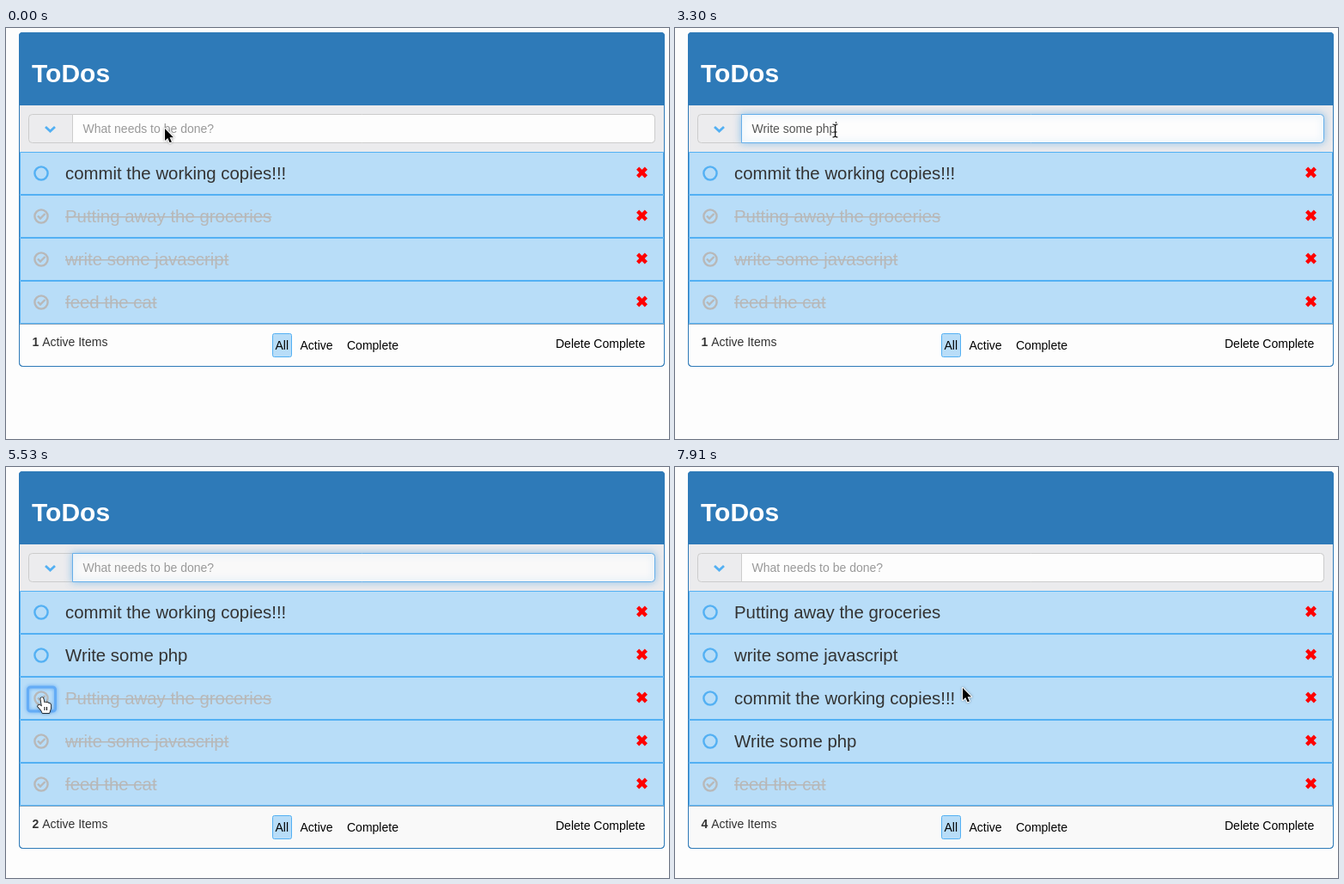
Write an HTML page with a canvas that moves like this. It is 772 by 478 pixels and loops after 8000 ms.

```html
<!DOCTYPE html>
<html lang="en">
<head>
<meta charset="utf-8">
<title>ToDos</title>
<style>
html, body { margin: 0; width: 100%; height: 100%; overflow: hidden; background: #fdfdfd; }
canvas { display: block; }
</style>
</head>
<body>
<canvas id="stage" width="772" height="478"></canvas>
<script>
const g = document.getElementById('stage').getContext('2d');
const LOOP = 8000, MOVE_START = 4490, TICK = 148;
const BLUE = '#2e7ab8', SKY = '#53b0f3', ROW = '#b8ddf8', DONE = '#b8b8b8';
const NEW_ITEM = 'Write some php';
const COMMIT = 'commit the working copies!!!', GROCERIES = 'Putting away the groceries';
const SCRIPT = 'write some javascript', CAT = 'feed the cat';

// The first `active` items of each list are open, the rest are done.
const lists = [
  { active: 1, items: [COMMIT, GROCERIES, SCRIPT, CAT] },
  { active: 2, items: [COMMIT, NEW_ITEM, GROCERIES, SCRIPT, CAT] },
  { active: 3, items: [GROCERIES, COMMIT, NEW_ITEM, SCRIPT, CAT] },
  { active: 4, items: [GROCERIES, SCRIPT, COMMIT, NEW_ITEM, CAT] }
];

// Pointer path: tick, x, y
const path = [
  [-1, 186, 119], [6, 42, 268], [9, 42, 268], [10, 41, 284], [11, 39, 297], [12, 42, 318],
  [14, 42, 318], [15, 60, 318], [16, 60, 318], [19, 395, 269], [22, 395, 269], [23, 335, 257]
];

const arrow = new Path2D('M0 0V14L3.3 11L5.6 16.3L7.9 15.4L5.6 10.2H10Z');
const beam = new Path2D('M-3-7Q0-7 0-5Q0-7 3-7M0-5V6M-3 8Q0 8 0 6Q0 8 3 8M-2 2H2');
const hand = new Path2D('M-1.7 1.2Q0-1 1.5 1.2L2.6 6.2Q4 5 5.2 6.3Q6.8 5.4 7.8 7Q9.6 6.5 10.2 8.6' +
  'L10 13L8.4 18H.5L-1 15L-5 10.5Q-4.4 8-2 9.3L-.2 10.4Z');

function text(str, x, y, size, color, weight = 'normal') {
  g.font = `${weight} ${size}px "Liberation Sans", Arial, sans-serif`;
  g.fillStyle = color;
  g.fillText(str, x, y);
  return g.measureText(str).width;
}

function box(x, y, w, h, radius, fill, stroke) {
  g.beginPath();
  g.roundRect(x, y, w, h, radius);
  if (fill) { g.fillStyle = fill; g.fill(); }
  if (stroke) { g.strokeStyle = stroke; g.stroke(); }
}

function line(points, color, width) {
  g.beginPath();
  points.forEach(([x, y]) => g.lineTo(x, y));
  g.strokeStyle = color;
  g.lineWidth = width;
  g.stroke();
  g.lineWidth = 1;
}

function withGlow(color, blur, draw) {
  g.save();
  g.shadowColor = color;
  g.shadowBlur = blur;
  draw();
  g.restore();
}

function drawRow(label, y, done) {
  box(16.5, y + .5, 749, 49, 0, ROW, SKY);
  const cy = y + 25, color = done ? DONE : SKY;
  g.beginPath();
  g.arc(41, cy, 7.6, 0, 7);
  g.strokeStyle = color;
  g.lineWidth = 2.4;
  g.stroke();
  g.lineWidth = 1;
  if (done) line([[37, cy - .5], [40, cy + 2.5], [45.5, cy - 3]], color, 2.4);
  const width = text(label, 69, y + 32, 20.4, done ? DONE : '#333');
  if (done) {
    g.fillStyle = DONE;
    g.fillRect(69, y + 25, width, 1.5);
  }
  for (const s of [-1, 1])
    line([[740.5 - 4.9, cy - 1 - 4.9 * s], [740.5 + 4.9, cy - 1 + 4.9 * s]], '#f00', 4.4);
}

function drawInput(t, glow) {
  const tinted = t >= 3600 && glow;
  box(26.5, 100.5, 729, 33, 4, '#ececee', '#ccc');
  line([[46, 115], [51.5, 120], [57, 115]], SKY, 2.8);
  const field = stroke => box(77.5, 100.5, 678, 33, [0, 4, 4, 0], tinted ? '#f9f9f9' : '#fdfdfd', stroke);
  field('#ccc');
  if (glow) {
    g.globalAlpha = glow;
    withGlow('rgba(102,175,233,.7)', 8, () => field('#66afe9'));
    g.globalAlpha = 1;
  }
  const typed = NEW_ITEM.slice(0, typedLength(t));
  const width = typed ? text(typed, 89.5, 122, 14, '#555') : 0;
  if (!typed) text('What needs to be done?', 89.5, 122, 14, '#999');
  const blink = t < 1680 ? t >= 500 && t < 1240
    : t >= 3600 && t < 5400 && Math.floor((t - 3600) / 600) % 2 === 0;
  if (typed || blink) {
    g.fillStyle = '#222';
    g.fillRect(Math.round(89.5 + width), 109, 1, 16);
  }
}

function typedLength(t) {
  if (t < 1680 || t >= 3600) return 0;
  if (t < 1980) return 1;
  if (t >= 3300) return NEW_ITEM.length;
  return Math.round(2 + Math.min(7, Math.floor((t - 1980) / 145)) * 10 / 7);
}

function drawFooter(y, active, fill) {
  box(16, y, 750, 49, [0, 0, 4, 4], fill);
  g.fillStyle = '#a9b4bd';
  g.fillRect(16, y, 750, 1);
  const width = text(active, 30.5, y + 26, 14, '#333', 'bold');
  text(' Active Items', 30.5 + width, y + 26, 14, '#333');
  box(310.5, y + 11.5, 22, 27, 2, ROW, SKY);
  text('All', 313.5, y + 30, 14, '#000');
  text('Active', 342.5, y + 30, 14, '#000');
  text('Complete', 397, y + 30, 14, '#000');
  text('Delete Complete', 640, y + 28, 14, '#000');
}

function pointerAt(tick) {
  const i = path.findIndex(key => key[0] >= tick);
  if (i === 0) return path[0].slice(1);
  if (i < 0) return path[path.length - 1].slice(1);
  const [a, x0, y0] = path[i - 1], [b, x1, y1] = path[i];
  const p = (tick - a) / (b - a), e = p * p * (3 - 2 * p);
  return [x0 + (x1 - x0) * e, y0 + (y1 - y0) * e];
}

function drawPointer(t, tick) {
  const [x, y] = t < 500 ? [185, 117] : pointerAt(tick);
  const overInput = t >= 500 && y < 134;
  const overCircle = Math.abs(x - 41) < 16 && [269, 319].some(c => Math.abs(y - c) < 13);
  g.save();
  g.translate(Math.round(x), Math.round(y));
  g.lineJoin = 'round';
  const outline = (shape, color, width) => {
    g.strokeStyle = color;
    g.lineWidth = width;
    g.stroke(shape);
  };
  if (overInput) {
    g.translate(.5, 0);
    outline(beam, 'rgba(255,255,255,.8)', 3);
    outline(beam, '#111', 1.2);
  } else {
    const shape = overCircle ? hand : arrow;
    withGlow('rgba(0,0,0,.4)', 3, () => outline(shape, overCircle ? '#000' : '#fff', overCircle ? 1.4 : 2));
    g.fillStyle = overCircle ? '#fff' : '#000';
    g.fill(shape);
    if (overCircle) line([[3, 11], [3, 15]], '#000', 1), line([[5.5, 11], [5.5, 15]], '#000', 1);
  }
  g.restore();
}

function draw(t) {
  const tick = Math.max(-1, Math.floor((t - MOVE_START) / TICK));
  const { active, items } = lists[t < 3600 ? 0 : tick < 8 ? 1 : tick < 14 ? 2 : 3];
  const glow = t < 500 || tick > 8 ? 0 : t < 640 ? .5 : tick === 8 ? .3 : 1;
  const footerY = 144 + items.length * 50;

  g.fillStyle = '#fdfdfd';
  g.fillRect(0, 0, 772, 478);
  box(15.5, 5.5, 751, footerY + 44, 4, '#ebebed', BLUE);
  box(15, 5, 752, 85, [4, 4, 0, 0], BLUE);
  text('ToDos', 30, 63, 30, '#fff', 'bold');
  drawInput(t, glow);
  drawFooter(footerY, active, t < 3600 ? '#fdfdfd' : '#f9f9f9');
  items.forEach((label, i) => drawRow(label, 144 + i * 50, i >= active));
  g.fillStyle = '#8fa9bd';
  g.fillRect(16, footerY, 750, 1);
  box(15.5, 5.5, 751, footerY + 44, 4, null, BLUE);

  const focused = { 7: 2, 13: 3 }[tick];
  if (focused) withGlow('#5ea8f5', 4, () => {
    g.lineWidth = 3;
    box(25.5, 156 + focused * 50, 32, 28, 3, null, '#64acf6');
  });
  drawPointer(t, tick);
}

function loop() {
  draw(performance.now() % LOOP);
  requestAnimationFrame(loop);
}
loop();
</script>
</body>
</html>
```
